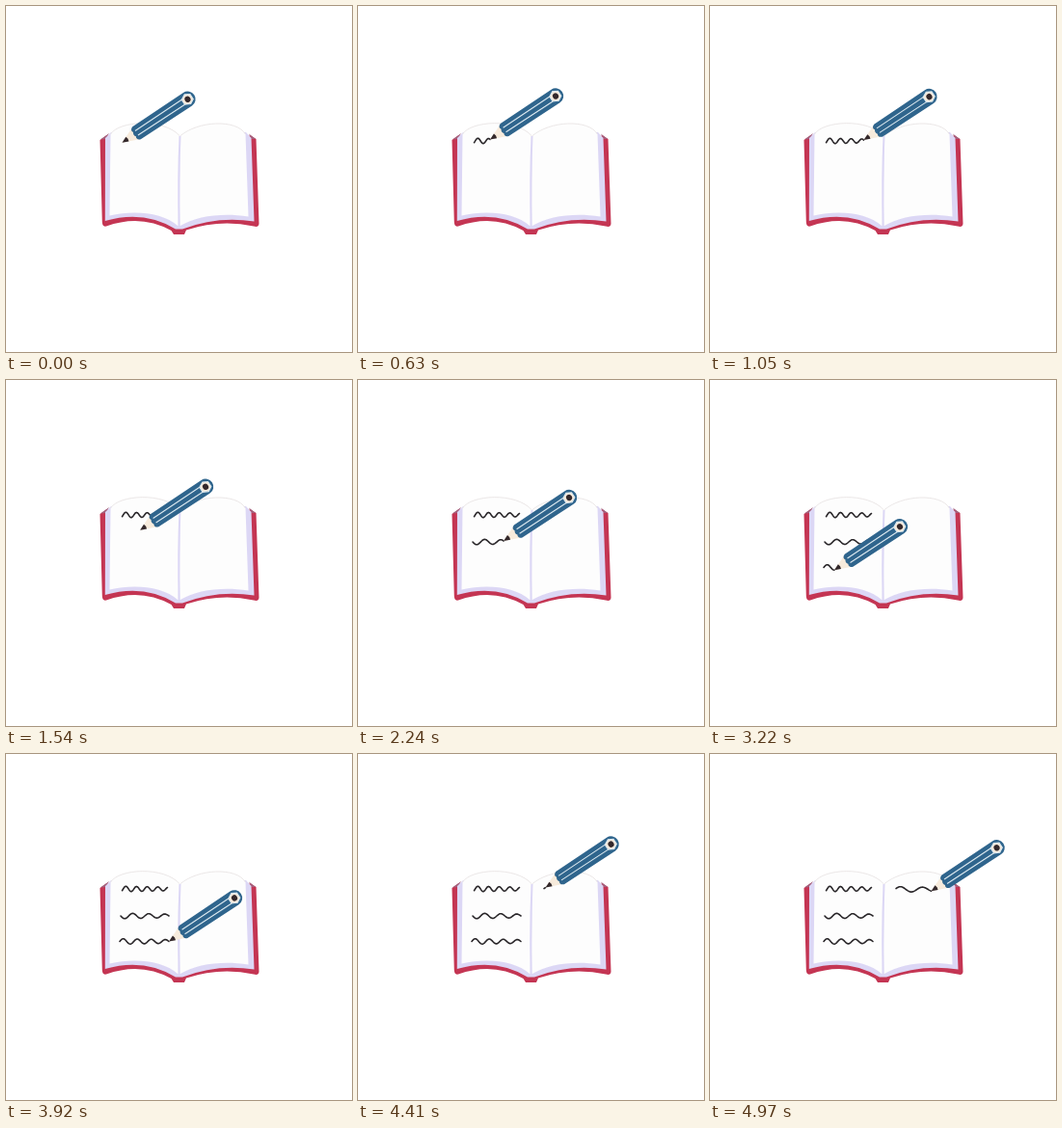
Recreate the animation shown at these times as an HTML page. Size 359 px wide and 359 px high, loop 5040 ms.

```html
<!DOCTYPE html>
<html lang="en">
<head>
<meta charset="utf-8">
<title>Writing in a notebook</title>
<style>
  html, body { margin: 0; width: 100%; height: 100%; overflow: hidden; background: #fff; }
  svg { display: block; width: 100vw; height: 100vh; }
  #ink { fill: none; stroke: #292629; stroke-width: 1.6; stroke-linecap: round; stroke-linejoin: round; }
  .wood { fill: #f7ebdc; }
  .dark { fill: #33282b; }
  .paint { fill: #2f658d; }
  .shine { stroke: #dce9f0; stroke-width: 1.1; }
  .cover { fill: #c43553; }
  .fold { fill: #a3607c; }
  .edge { fill: #dcd7f5; }
  .page { fill: #fdfdfd; stroke: none; }
</style>
</head>
<body>
<svg viewBox="0 0 359 359">
  <g id="book">
    <path class="cover" d="M97.5 139 L104 134.5 L180 140 L254 134.5 L259.5 138 L262.5 226 Q262 230 257 228.5 Q222 221 187 232.5 L185 237 H174 L171.5 233 Q140 215.5 104 228.5 Q100 229.5 99.8 224 Z"/>
    <path class="fold" d="M98 138.5 L107 132 L103.5 138 Z M252 132.5 L259 138 L255 138 Z"/>
    <path class="edge" d="M103 137 L109 131 L180 135 L249 131 L254.5 137 L257.5 223.5 Q219 217.5 183 231.5 H176 Q143 211.4 102.8 223 Z"/>
    <path class="page" d="M108.5 133 C117 119 164 116 180.5 135 L178.7 228.5 C162 213.5 132 212 107.5 217.5 Z"/>
    <path class="page" d="M180.5 135 C199 119 239 117 248.5 133 L251.5 218.5 C226 214.5 199 217 180 228.5 Z"/>
    <path fill="none" stroke="#e6e1e1" stroke-width=".8" d="M108.5 133 C117 119 164 116 180.5 135 C199 119 239 117 248.5 133"/>
    <path fill="none" stroke="#dcd7f5" stroke-width="2" d="M180.5 135 Q178.5 180 179.7 229"/>
  </g>
  <path id="ink"/>
  <!-- the pencil's point is at its local origin -->
  <g id="pencil">
    <g transform="rotate(-33.5)">
      <path class="wood" d="M0 0 L17 -7 L20 0 L17 7 Z"/>
      <path class="dark" d="M0 0 L6.5 -2.8 Q8 0 6.5 2.8 Z"/>
      <path class="paint" d="M18 -7.8 Q13.5 -6 15.5 -2.6 Q13.5 0 15.5 2.6 Q13.5 6 18 7.8 L81.5 8.2 A8.2 8.2 0 0 0 81.5 -8.2 Z"/>
      <path class="shine" fill="none" d="M18 -2.7 L76 -3 M18 2.7 L76 3"/>
      <path class="wood shine" d="M76 -3 L81.5 -5.8 L86.5 -3 V3 L81.5 5.8 L76 3 Z"/>
      <ellipse class="dark" cx="81.5" rx="3" ry="3.2"/>
    </g>
  </g>
</svg>
<script>
const LOOP = 5040, STEP = 70;
const FIRST = 320, EVERY = 1355, WRITE = 880;   // rhythm of the lines, in ms
const HEIGHT = 2.9;

// Squiggles: left end, middle height, width, and phase in half waves (even = crest).
const LINES = [
  { x: 120.5, y: 140, width: 47, phase: 1.3, halves: 8.5 },
  { x: 119, y: 168, width: 50, phase: 0.5, halves: 6 },
  { x: 118, y: 194.5, width: 51, phase: 1.5, halves: 7 },
  { x: 193, y: 140.5, width: 55, phase: 1.6, halves: 4.8 }
];

const ink = document.getElementById('ink');
const pencil = document.getElementById('pencil');
const clamp = v => Math.max(0, Math.min(1, v));

// Point on a line's wave, u from 0 to 1; the wave flattens to the right.
function wave({ x, y, width, phase, halves }, u) {
  const swing = HEIGHT * (1 - 0.35 * u) * Math.cos(Math.PI * (phase + halves * u));
  return [x + width * u, y - swing];
}

function squiggle(line, upTo) {
  if (upTo <= 0) return '';
  const n = Math.ceil(upTo * 60);
  const points = Array.from({ length: n + 1 }, (_, i) => wave(line, upTo * i / n));
  return 'M' + points.join('L');
}

function tipAt(t) {
  const i = Math.max(0, Math.floor((t - FIRST) / EVERY));
  const since = t - FIRST - i * EVERY;
  if (since <= WRITE || i === LINES.length - 1) return wave(LINES[i], clamp(since / WRITE));
  const from = wave(LINES[i], 1), to = wave(LINES[i + 1], 0);
  const k = ((since - WRITE) / (EVERY - WRITE)) ** 1.6;
  return from.map((v, axis) => v + (to[axis] - v) * k);
}

function draw(t) {
  const written = i => clamp((t - FIRST - i * EVERY) / WRITE);
  ink.setAttribute('d', LINES.map((line, i) => squiggle(line, written(i))).join(''));
  pencil.setAttribute('transform', `translate(${tipAt(t)})`);
}

const began = performance.now();
function tick() {
  const t = (performance.now() - began) % LOOP;
  draw(Math.floor(t / STEP) * STEP);
  requestAnimationFrame(tick);
}
tick();
</script>
</body>
</html>
```
